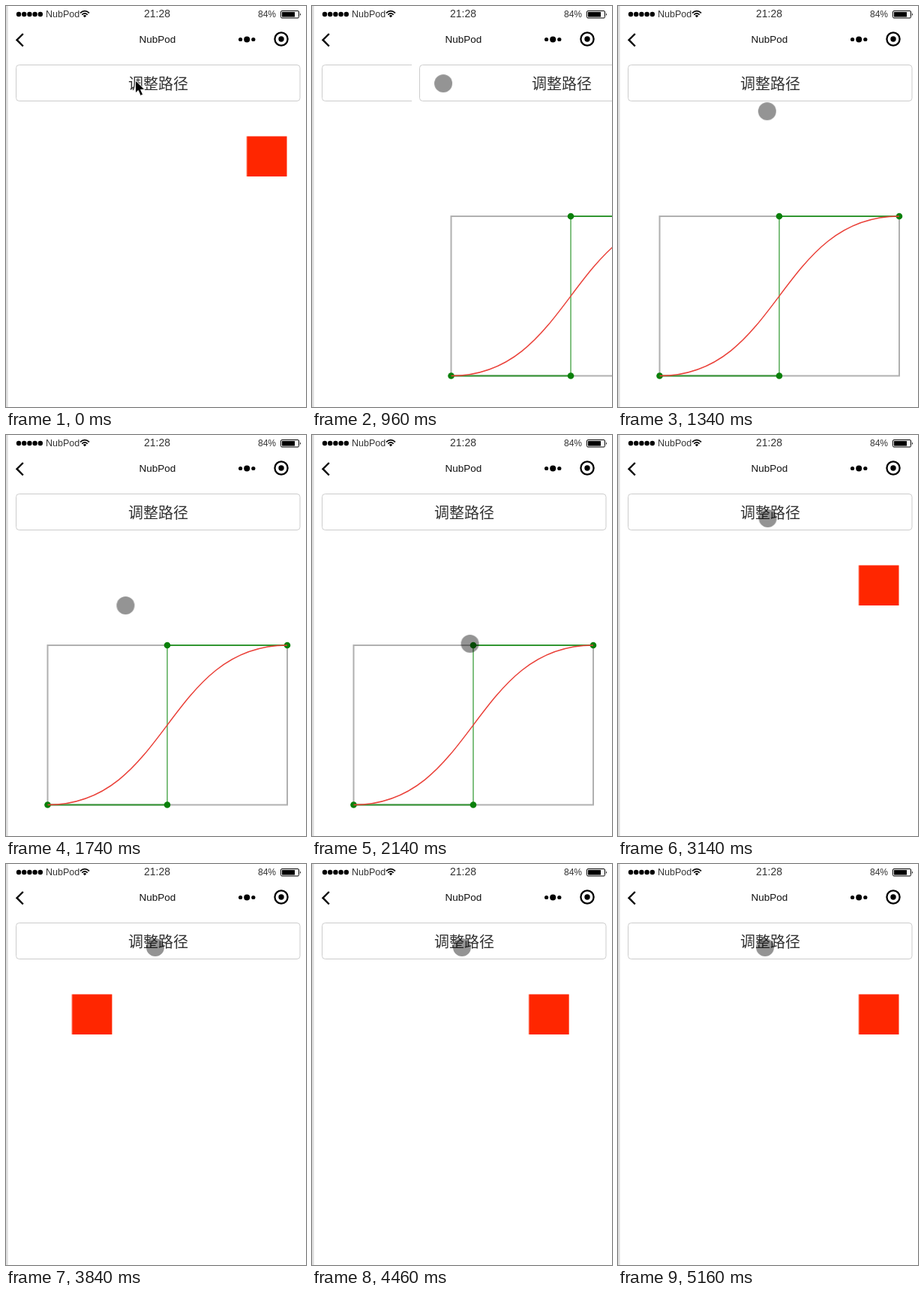
Recreate the animation shown at these times as an HTML page. Size 400 px wide and 534 px high, loop 5.18 s.

```html
<!DOCTYPE html>
<html lang="zh-CN">
<head>
<meta charset="utf-8">
<title>调整路径</title>
<style>
  html, body { margin: 0; width: 100%; height: 100%; overflow: hidden; background: #fff; }
  svg { display: block; width: 400px; height: 534px; }
  text { font-family: "Liberation Sans", Arial, sans-serif; fill: #111; }
  .mid { text-anchor: middle; }
  .status { fill: #333; }
  .label { font: 300 20px "Noto Sans CJK SC", "Noto Sans CJK", sans-serif; fill: #333; }
  .line { fill: none; stroke: #000; }

  .anim { animation: 5180ms linear infinite; }
  .square { animation-name: square; }
  .page { animation-name: slide; }
  .tap1 { animation-name: tap1; animation-timing-function: step-end; }
  .tap2 { animation-name: tap2; animation-timing-function: step-end; }
  .arrow { animation-name: arrow; animation-timing-function: step-end; }
  .touch { animation-name: wander; }
  .touch circle { animation-name: touch; animation-timing-function: step-end; }

  /* jumps to the left, then follows the curve of the second page */
  @keyframes square {
    0%, 68.72% { transform: translateX(265.5px); }
    68.725% { transform: translateX(1px); animation-timing-function: cubic-bezier(.472, .069, .491, 1); }
    92.86%, 100% { transform: translateX(265.5px); }
  }
  @keyframes slide {
    0%, 16.216% { transform: translateX(397px); animation-timing-function: ease; }
    22.16%, 49.9% { transform: none; animation-timing-function: ease; }
    55.85%, 100% { transform: translateX(397px); }
  }
  @keyframes tap1 {
    0% { opacity: 1; }
    10.81% { opacity: .5; }
    13.12%, 100% { opacity: 1; }
  }
  @keyframes tap2 {
    0% { opacity: 1; }
    47.68% { opacity: .5; }
    55.85%, 100% { opacity: 1; }
  }
  @keyframes arrow {
    0% { opacity: 1; }
    .386%, 100% { opacity: 0; }
  }
  @keyframes touch {
    0% { opacity: 0; }
    .386%, 100% { opacity: 1; }
  }
  @keyframes wander {
    0% { transform: translate(176px, 108px); }
    10.8%, 18.53% { transform: translate(175px, 103px); }
    26.25% { transform: translate(200px, 142px); }
    28.57% { transform: translate(354px, 230px); }
    30.7% { transform: translate(250px, 340px); }
    32.43% { transform: translate(134px, 270px); }
    33.59% { transform: translate(158.5px, 228px); }
    35.14% { transform: translate(230px, 150px); }
    37.07% { transform: translate(354px, 235px); }
    39.77% { transform: translate(280px, 330px); }
    42.47% { transform: translate(160px, 240px); }
    46.33%, 54% { transform: translate(200px, 111px); }
    74.13% { transform: translate(199px, 111px); }
    86.1% { transform: translate(200px, 111px); }
    100% { transform: translate(196px, 111px); }
  }
</style>
</head>
<body>
<svg viewBox="0 0 400 534">
  <defs>
    <g id="button">
      <rect x="13.5" y="78.5" width="378.5" height="48" rx="4" fill="#fff" stroke="#ccc"/>
      <text class="label mid" x="203" y="110.5">调整路径</text>
    </g>
  </defs>

  <!-- first page -->
  <g class="anim tap1"><use href="#button"/></g>
  <rect class="anim square" x="55.5" y="173.5" width="53.5" height="53.5" fill="#ff2600"/>

  <!-- second page -->
  <g class="anim page">
    <rect x="3" y="66" width="400" height="468" fill="#fff"/>
    <g class="anim tap2"><use href="#button"/></g>
    <g fill="none" stroke-width="2">
      <rect x="55.5" y="280" width="319.5" height="212.5" stroke="#b0b0b0"/>
      <path d="M215 492.5V280" stroke="#80c080"/>
      <path d="M55.5 492.5H215M215 280H375" stroke="#329632"/>
    </g>
    <g fill="#0a800a">
      <circle cx="55.5" cy="492.5" r="4.3"/>
      <circle cx="215" cy="492.5" r="4.3"/>
      <circle cx="215" cy="280" r="4.3"/>
      <circle cx="375" cy="280" r="4.3"/>
    </g>
    <path d="M55.5 492.5C215 492.5 215 280 375 280" fill="none" stroke="#ea4038" stroke-width="1.5"/>
  </g>

  <!-- status bar -->
  <path d="M17 11H47" stroke="#000" stroke-width="6.4" stroke-linecap="round" stroke-dasharray="0 7.2"/>
  <text class="status" x="53" y="15" font-size="12.5">NubPod</text>
  <g class="line" stroke-width="1.7">
    <path d="M99 9.3Q105 3.8 111 9.3M101.3 11.6Q105 8.2 108.7 11.6"/>
  </g>
  <path d="M102.8 13Q105 11.2 107.2 13L105 15.2Z"/>
  <text class="status mid" x="201.5" y="15" font-size="14">21:28</text>
  <text class="status" x="336" y="15" font-size="12">84%</text>
  <rect class="line" x="366.5" y="6.5" width="24" height="9.5" rx="1.5"/>
  <rect x="368" y="8" width="17" height="6.5"/>
  <path d="M392 9.5Q394 11.2 392 13Z"/>

  <!-- title bar -->
  <path class="line" d="M22.8 37L14.5 45.2L22.8 53.5" stroke-width="2.4"/>
  <text class="mid" x="201.8" y="48.5" font-size="13.5">NubPod</text>
  <circle cx="312.6" cy="44.5" r="2.6"/>
  <circle cx="321.2" cy="44.5" r="4"/>
  <circle cx="329.8" cy="44.5" r="2.6"/>
  <circle class="line" cx="367" cy="44" r="8.6" stroke-width="2.3"/>
  <circle cx="367" cy="44" r="3.7"/>

  <rect width="2.6" height="534" fill="#dcdcdc"/>

  <!-- pointer -->
  <path class="anim arrow" d="M172.5 99V116L176.3 112.5L179.3 119.5L182.6 118L179.6 111.3H185Z" stroke="#fff"/>
  <g class="anim touch"><circle class="anim" r="12" fill="#000" fill-opacity=".42"/></g>
</svg>
</body>
</html>
```
